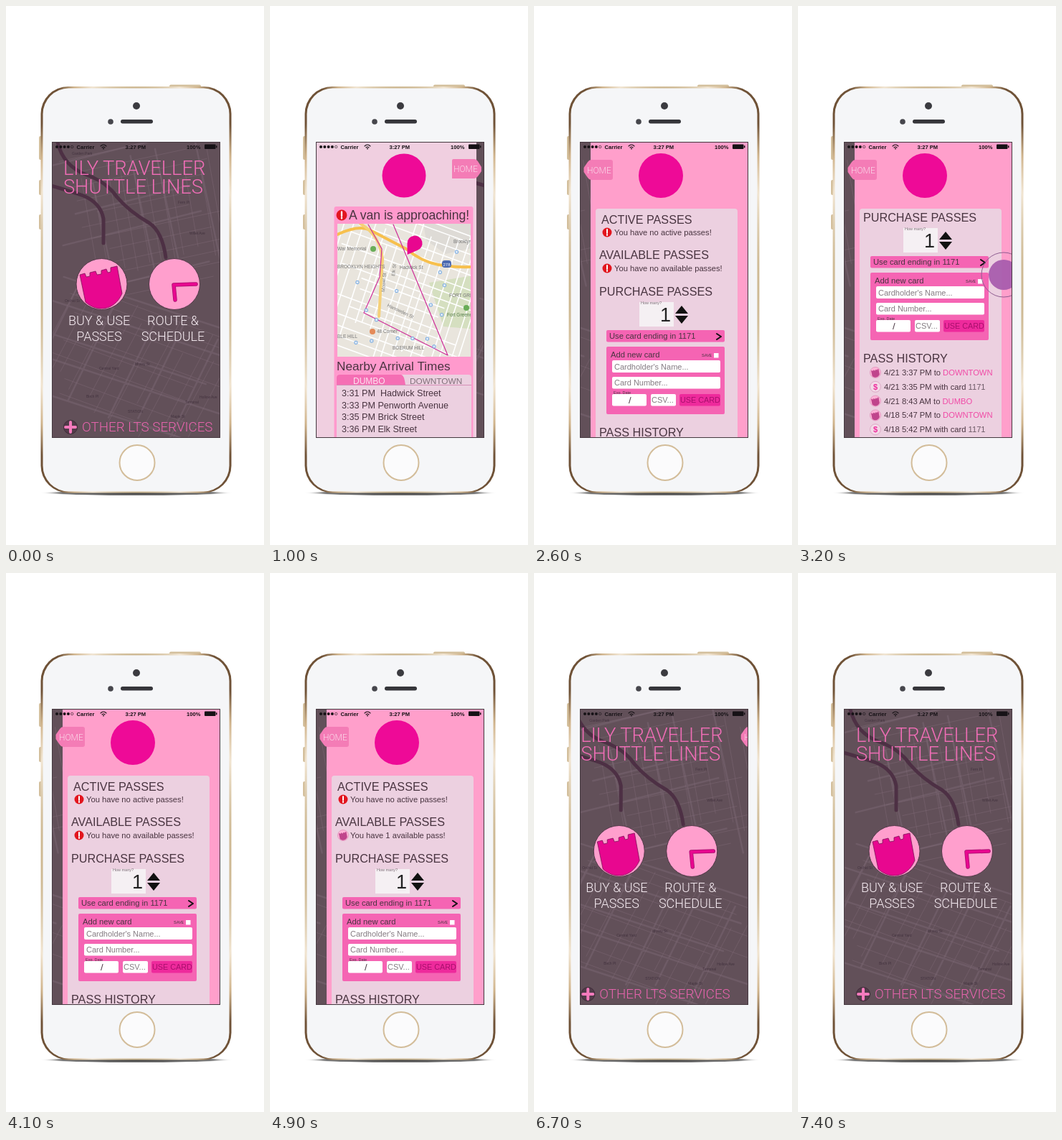
Write an HTML page that moves like this. It is 360x750 px and loops after 7.5 s.

```html
<!DOCTYPE html>
<html lang="en">
<head>
<meta charset="utf-8">
<title>Shuttle app walkthrough</title>
<style>
  html, body { margin: 0; width: 100%; height: 100%; overflow: hidden; background: #fff; }
  svg { display: block; width: 360px; height: 750px; font-family: "Liberation Sans", Arial, sans-serif; fill: #493440; }
  text { white-space: pre; }
  .thin { font-family: Roboto, sans-serif; font-weight: 300; }
  .title { font-size: 27.4px; letter-spacing: -.1px; fill: #f06db6; }
  .menu { font-size: 18px; fill: #f7edf3; text-anchor: middle; }
  .head { font-size: 16.2px; }
  .body { font-size: 11.2px; }
  .tiny { font-size: 5.5px; }
  .place { font-size: 6.5px; fill: #777; }
  .tab { font-size: 12px; fill: #fbd9e9; }
  .hint { font-size: 11px; fill: #857b82; }
  .line { fill: none; stroke-linecap: round; stroke-linejoin: round; }
  .hot { fill: #e8078f; }
  .form { fill: #f564b3; }
</style>
</head>
<body>
<svg viewBox="0 0 360 750">
  <defs>
    <radialGradient id="gold" r=".66">
      <stop offset=".75" stop-color="#cdb892"/><stop offset=".83" stop-color="#f1e5d2"/>
      <stop offset=".9" stop-color="#d0b48c"/><stop offset=".97" stop-color="#6f5237"/>
    </radialGradient>
    <radialGradient id="shade"><stop offset="0" stop-color="#333"/><stop offset=".8" stop-color="#777"/><stop offset="1" stop-color="#fff" stop-opacity="0"/></radialGradient>
    <clipPath id="screen"><rect x="65" y="190" width="234" height="410"/></clipPath>
    <clipPath id="mapClip"><rect x="94" y="303" width="186" height="185"/></clipPath>
    <clipPath id="listClip"><rect x="86" y="283" width="206" height="317"/></clipPath>
    <g id="alert">
      <circle r="6.5" fill="#e2161f"/>
      <path d="M0-4V1M0 3V4" class="line" stroke="#fff" stroke-width="2"/>
    </g>
    <path id="castle" d="M-30-13l7-2 2 5 5-1 0-5 8-2 2 5 6-1 0-5 7-2 2 5 4-1 0-6 9-2 7 38C18 38-7 39-22 25Z"/>
    <g id="pass">
      <circle r="7.5" fill="#ffb5d8" stroke="#e59bc2"/>
      <use href="#castle" transform="scale(.2)" fill="#c0458c"/>
    </g>
    <g id="dollar">
      <circle r="7.5" fill="#f3d9e7" stroke="#dcaac6"/>
      <text y="4" font-size="11" text-anchor="middle" fill="#ee2a9c" font-weight="bold">$</text>
    </g>
  </defs>

  <!-- phone -->
  <ellipse cx="182" cy="677.500" rx="135" ry="4" fill="url(#shade)"/>
  <g fill="#d3bf9c">
    <rect x="228" y="109.500" width="44" height="6" rx="2"/>
    <rect x="46" y="181" width="5" height="33" rx="2"/>
    <rect x="46" y="242" width="5" height="21" rx="2"/>
    <rect x="46" y="290" width="5" height="21" rx="2"/>
  </g>
  <rect x="48.500" y="112" width="266" height="565.500" rx="38" fill="url(#gold)"/>
  <rect x="51.500" y="114.500" width="260" height="561" rx="36" fill="#f5f6f8"/>
  <circle cx="182" cy="139" r="5" fill="#3b3b40"/>
  <circle cx="146" cy="161" r="3.800" fill="#46464c"/>
  <rect x="160" y="158" width="45" height="5.500" rx="2.700" fill="#35353a"/>
  <circle cx="183" cy="635.500" r="24.500" fill="#fbfbfc" stroke="#d3bd9a" stroke-width="2"/>

  <g clip-path="url(#screen)">
    <g id="strip">
      <!-- home -->
      <rect x="48" y="190" width="268" height="410" fill="#625059"/>
      <g class="line" stroke="#806c79">
        <path id="lanes" stroke-opacity=".45"/>
        <path id="avenues" stroke-opacity=".4" stroke-width="2.500"/>
      </g>
      <g class="line" stroke="#4d3044" stroke-width="5">
        <path d="M48 246Q85 256 108 264Q132 274 136 296V330"/>
        <path d="M72 190Q80 222 110 234Q140 244 155 266Q172 286 200 302Q218 314 223 350"/>
      </g>
      <g id="labels" font-size="5" fill="#43333f"></g>
      <g class="thin">
        <text class="title" x="80" y="235">LILY TRAVELLER</text>
        <text class="title" x="80" y="261">SHUTTLE LINES</text>
        <text class="menu" x="130" y="444">BUY &amp; USE</text>
        <text class="menu" x="130" y="466">PASSES</text>
        <text class="menu" x="233" y="444">ROUTE &amp;</text>
        <text class="menu" x="233" y="466">SCHEDULE</text>
        <text x="106" y="592" font-size="18.800" fill="#e864ae">OTHER LTS SERVICES</text>
      </g>
      <g fill="#ff9fcd" stroke="#54394a">
        <circle cx="133.500" cy="387" r="35.500"/>
        <circle cx="235" cy="387" r="35.500"/>
      </g>
      <use href="#castle" x="133" y="387" class="hot" stroke="#7d1659" stroke-width=".8"/>
      <path d="M265 387L234 388 236 409" class="line" stroke="#a30f6d" stroke-width="5.500"/>
      <path d="M265 387L234 388 236 409" class="line" stroke="#e8078f" stroke-width="4"/>
      <circle cx="90" cy="586" r="9.500" fill="#513b49" stroke="#3f2b39"/>
      <path d="M83 586H97M90 579V593" class="line" stroke="#f47bbd" stroke-width="4"/>

      <!-- route and schedule, left of home -->
      <g transform="translate(-238)">
        <rect x="48" y="190" width="240" height="410" fill="#f0cfe0"/>
        <path d="M256 213H285Q288 213 290 216L295 224V230L290 237Q288 240 285 240H254V215Q254 213 256 213Z" fill="#f47cb6"/>
        <text class="thin tab" x="256" y="231">HOME</text>
        <circle cx="187" cy="236" r="30.500" fill="#ee0a97"/>
        <rect x="89.500" y="279" width="194" height="330" rx="3" fill="#ff9acd"/>
        <use href="#alert" transform="translate(100 291) scale(1.150)"/>
        <text x="110" y="297" font-size="17.600">A van is approaching!</text>
        <g clip-path="url(#mapClip)">
          <rect x="94" y="303" width="186" height="185" fill="#e9e5dd"/>
          <path d="M222 385L290 374V450L242 446Z" fill="#d5dfc0"/>
          <path d="M214 303H290V335L245 345 218 326Z" fill="#dedbd6"/>
          <path id="blocks" class="line" stroke="#fff" stroke-width="1.600"/>
          <g class="line" stroke="#f7c04d" stroke-width="4">
            <path d="M94 318Q124 304 140 312Q165 325 190 338Q212 356 235 360T282 363"/>
            <path d="M126 303Q153 318 157 352L152 432" stroke="#f5d078"/>
          </g>
          <path d="M137 304L156 338 153 377 131 427 248 486 172 304" class="line" stroke="#cf2e99" stroke-width="1.200"/>
          <g class="place">
            <text x="94" y="340">War Memorial</text>
            <text x="94" y="365">BROOKLYN HEIGHTS</text>
            <text x="256" y="330">Brooklyn</text>
            <text x="181" y="366">Hadwick St</text>
            <text transform="translate(160 398) rotate(-86)">Mowel St</text>
            <text transform="translate(174 376) rotate(-84)">Elk St</text>
            <text transform="translate(163 418) rotate(25)">Harrowden St</text>
            <text x="250" y="405">FORT GREENE</text>
            <text x="247" y="432" fill="#507a45">Fort Greene</text>
            <text x="149" y="455">48 Corner</text>
            <text x="94" y="462">BLE HILL</text>
            <text x="171" y="478">BOERUM HILL</text>
          </g>
          <rect x="240" y="354" width="13" height="10" rx="4" fill="#4b69b0"/>
          <text x="246.500" y="361.500" font-size="6" fill="#fff" text-anchor="middle">278</text>
          <g id="stops" fill="#dfeaf6" stroke="#6fa5e0"></g>
          <g fill="#69ad58"><circle cx="144" cy="338" r="4"/><circle cx="274" cy="420" r="4"/></g>
          <circle cx="143" cy="453" r="4" fill="#e48a58"/>
          <path id="van" d="M0 0V-16A10.500 10.500 0 1 1 14-6Z" class="hot"/>
        </g>
        <text x="93" y="507" font-size="17.200">Nearby Arrival Times</text>
        <rect x="93" y="513" width="188" height="90" rx="4" fill="#ecd0e0"/>
        <path d="M93 527V517Q93 513 97 513H183Q187 513 189 527Z" fill="#f56eb4"/>
        <path d="M93 527.500H281" stroke="#d58fb7"/>
        <text x="116" y="525.500" font-size="12" fill="#fbe3ef">DUMBO</text>
        <text x="195" y="525.500" font-size="11.800" fill="#806f79">DOWNTOWN</text>
        <g id="arrivals" font-size="12.600"></g>
      </g>

      <!-- passes, right of home -->
      <g transform="translate(234)">
        <rect x="79" y="190" width="240" height="410" fill="#ff9fcb"/>
        <path d="M80 214H107Q110 214 110 217V239Q110 242 107 242H80Q77 242 75 239L69.500 231V225L75 217Q77 214 80 214Z" fill="#f47cb6"/>
        <text class="thin tab" x="74" y="233">HOME</text>
        <circle cx="177" cy="236" r="31" fill="#ee0a97"/>
        <rect x="86" y="282" width="198" height="330" rx="4" fill="#ecd0e0"/>
        <g clip-path="url(#listClip)"><g id="list">
          <g class="head">
            <text x="94" y="303">ACTIVE PASSES</text>
            <text x="91" y="352">AVAILABLE PASSES</text>
            <text x="91" y="403">PURCHASE PASSES</text>
            <text x="91" y="599">PASS HISTORY</text>
          </g>
          <use href="#alert" x="102" y="315"/>
          <text class="body" x="112" y="319">You have no active passes!</text>
          <use id="stockIcon" x="102" y="365"/>
          <text id="stock" class="body" x="112" y="369"></text>
          <rect x="147" y="412" width="48" height="34" fill="#f5f0f3"/>
          <text class="tiny" x="149" y="415" fill="#7b6874">How many?</text>
          <text x="176" y="439" font-size="27" fill="#222">1</text>
          <path d="M197 428L206 417 215 428ZM197 431H215L206 442Z" fill="#111"/>
          <rect class="form" x="101" y="451" width="165" height="16.500" rx="2"/>
          <text class="body" x="105" y="463">Use card ending in 1171</text>
          <path d="M255 456L261 460 255 464" class="line" stroke="#111" stroke-width="2"/>
          <rect class="form" x="101" y="474" width="165" height="94" rx="2"/>
          <text class="body" x="107" y="488.500">Add new card</text>
          <text class="tiny" x="234" y="488">SAVE</text>
          <text class="tiny" x="111" y="539.500">Exp. Date</text>
          <g fill="#fff">
            <rect x="251" y="483" width="6.500" height="6.500"/>
            <rect x="109" y="493" width="151" height="17" rx="2"/>
            <rect x="109" y="516" width="151" height="16.500" rx="2"/>
            <rect x="109" y="540" width="48" height="16.500" rx="2"/>
            <rect x="163" y="540" width="35" height="16.500" rx="2"/>
          </g>
          <rect x="203" y="540" width="57" height="16.500" rx="2" fill="#ee2a9c"/>
          <g class="hint">
            <text x="112" y="505.500">Cardholder's Name...</text>
            <text x="112" y="528">Card Number...</text>
            <text x="164" y="552">CSV...</text>
          </g>
          <text x="132" y="553" font-size="13">/</text>
          <text x="204" y="552" font-size="10.800" fill="#a8106d">USE CARD</text>
          <g id="history" class="body"></g>
        </g></g>
      </g>
    </g>

    <!-- status bar -->
    <g fill="#161216">
      <circle cx="71" cy="196" r="2"/><circle cx="76.300" cy="196" r="2"/><circle cx="81.600" cy="196" r="2"/><circle cx="86.900" cy="196" r="2"/>
      <circle cx="92.200" cy="196" r="1.700" fill="none" stroke="#161216" stroke-width=".6"/>
      <g font-size="7.600" font-weight="bold">
        <text x="98.500" y="198.700">Carrier</text>
        <text x="166.500" y="198.700">3:27 PM</text>
        <text x="252" y="198.700">100%</text>
      </g>
      <path d="M132 195Q136 191 140 195M134 197Q136 195 138 197" class="line" stroke="#161216" stroke-width="1.100"/>
      <circle cx="136" cy="198.500" r=".9"/>
      <rect x="277" y="192.500" width="15.500" height="6.500" rx="1"/>
      <rect x="293" y="194.300" width="1.500" height="3"/>
    </g>

    <g id="touch">
      <circle r="31" fill="none" stroke="#8f5d91" stroke-width="1"/>
      <circle r="21" fill="#a95dae" fill-opacity=".95"/>
    </g>
  </g>
  <rect x="64.500" y="189.500" width="234" height="411" fill="none" stroke="#45383f"/>
</svg>
<script>
const $ = id => document.getElementById(id);
const move = (id, x, y) => $(id).setAttribute('transform', `translate(${x} ${y})`);

let seed = 7;
const rand = () => (seed = seed * 16807 % 2147483647) / 2147483647;

// Parallel streets at an angle in degrees, spaced unevenly around a centre
function grid(cx, cy, angle, count, gap, half) {
  const a = angle * Math.PI / 180, ux = Math.cos(a), uy = Math.sin(a);
  let d = '';
  for (let i = 0; i < count; i++) {
    const off = (i - count / 2 + rand() * .5) * gap;
    const x = cx - uy * off, y = cy + ux * off;
    const a1 = half * (.5 + rand() * .5), a2 = half * (.5 + rand() * .5);
    d += `M${x - ux * a1} ${y - uy * a1}L${x + ux * a2} ${y + uy * a2}`;
  }
  return d;
}
$('lanes').setAttribute('d',
  grid(200, 300, -12, 12, 18, 110) + grid(210, 290, 80, 12, 18, 90) +
  grid(180, 500, 20, 8, 22, 150) + grid(180, 500, -62, 12, 22, 90));
$('avenues').setAttribute('d',
  grid(200, 300, -14, 4, 55, 130) + grid(200, 300, 78, 4, 55, 110) +
  grid(180, 500, 18, 5, 42, 170) + grid(180, 500, -64, 5, 50, 110));
$('blocks').setAttribute('d',
  grid(187, 400, 20, 16, 14, 110) + grid(187, 400, -72, 17, 13, 110));

$('labels').innerHTML = ['Garden Park', 'Fern Pl', 'Willet Ave', 'Orchid St', 'Mossy St', 'Central Yard', 'Birch Pl', 'STATION', 'Terminal', 'Hollow Ave', 'Maple St']
  .map((name, i) => `<text x="${[92, 240, 256, 82, 180, 130, 112, 170, 250, 270, 230][i]}" y="${[207, 275, 318, 412, 500, 506, 545, 566, 553, 546, 573][i]}">${name}</text>`).join('');

for (let i = 0; i < 16; i++)
  $('stops').innerHTML += `<rect x="${100 + rand() * 172}" y="${340 + rand() * 138}" width="4" height="4" rx="1"/>`;

$('arrivals').innerHTML = ['3:31 PM  Hadwick Street', '3:33 PM Penworth Avenue', '3:35 PM Brick Street', '3:36 PM Elk Street']
  .map((s, i) => `<text x="100" y="${543 + i * 16.7}">${s}</text>`).join('');

const link = s => `<tspan fill="#f04aa6">${s}</tspan>`;
const card = 'with card <tspan fill="#6d5a66">1171</tspan>';
$('history').innerHTML = [
  ['pass', '4/21 3:37 PM to ' + link('DOWNTOWN')],
  ['dollar', '4/21 3:35 PM ' + card],
  ['pass', '4/21 8:43 AM to ' + link('DUMBO')],
  ['pass', '4/18 5:47 PM to ' + link('DOWNTOWN')],
  ['dollar', '4/18 5:42 PM ' + card],
  ['pass', '4/18 8:40 AM to ' + link('DUMBO')],
  ['pass', '4/17 5:51 PM to ' + link('DOWNTOWN')]
].map(([icon, s], i) => {
  const y = 613 + i * 19.8;
  return `<use href="#${icon}" x="108" y="${y}"/><text x="120" y="${y + 4}">${s}</text>`;
}).join('');

// Eased value from [time, value] keys
function at(keys, t) {
  const i = keys.findIndex(k => k[0] > t);
  if (i === 0) return keys[0][1];
  if (i < 0) return keys[keys.length - 1][1];
  const [t0, a] = keys[i - 1], [t1, b] = keys[i];
  return a + (b - a) * (1 - Math.cos(Math.PI * (t - t0) / (t1 - t0))) / 2;
}

const slide = [[200, 0], [800, 238], [1350, 238], [1800, 0], [2000, 0], [2100, -18], [2500, -234],
  [6200, -234], [6800, 1], [7400, 1], [7500, 0]];
const scroll = [[2800, 0], [3200, -103], [3300, -128], [3500, -128], [3900, 0]];
// Finger presses: start, end, x keys, y keys
const touches = [
  [200, 600, [[200, 90], [600, 260]], [[0, 238]]],
  [1300, 1700, [[1300, 262], [1700, 110]], [[0, 238]]],
  [2000, 2400, [[2000, 216], [2100, 198], [2400, 80]], [[0, 238]]],
  [2800, 3400, [[0, 287]], [[2800, 478], [3200, 374], [3300, 350]]],
  [3500, 3900, [[0, 287]], [[3500, 350], [3900, 478]]],
  [4600, 4900, [[0, 180]], [[0, 459]]],
  [6200, 6600, [[6200, 110], [6600, 260]], [[0, 238]]]
];

const start = performance.now();
function draw() {
  const t = Math.floor((performance.now() - start) % 7500 / 100) * 100;
  move('strip', at(slide, t), 0);
  move('list', 0, at(scroll, t));

  const vanY = 346 + (t - 1000) * .02;
  move('van', 172 + (vanY - 304) * 76 / 182 + 2, vanY);

  const bought = t >= 4900;
  $('stockIcon').setAttribute('href', bought ? '#pass' : '#alert');
  $('stock').textContent = bought ? 'You have 1 available pass!' : 'You have no available passes!';

  const press = touches.find(p => t >= p[0] && t < p[1]);
  $('touch').style.display = press ? '' : 'none';
  if (press) move('touch', at(press[2], t), at(press[3], t));
  requestAnimationFrame(draw);
}
draw();
</script>
</body>
</html>
```
